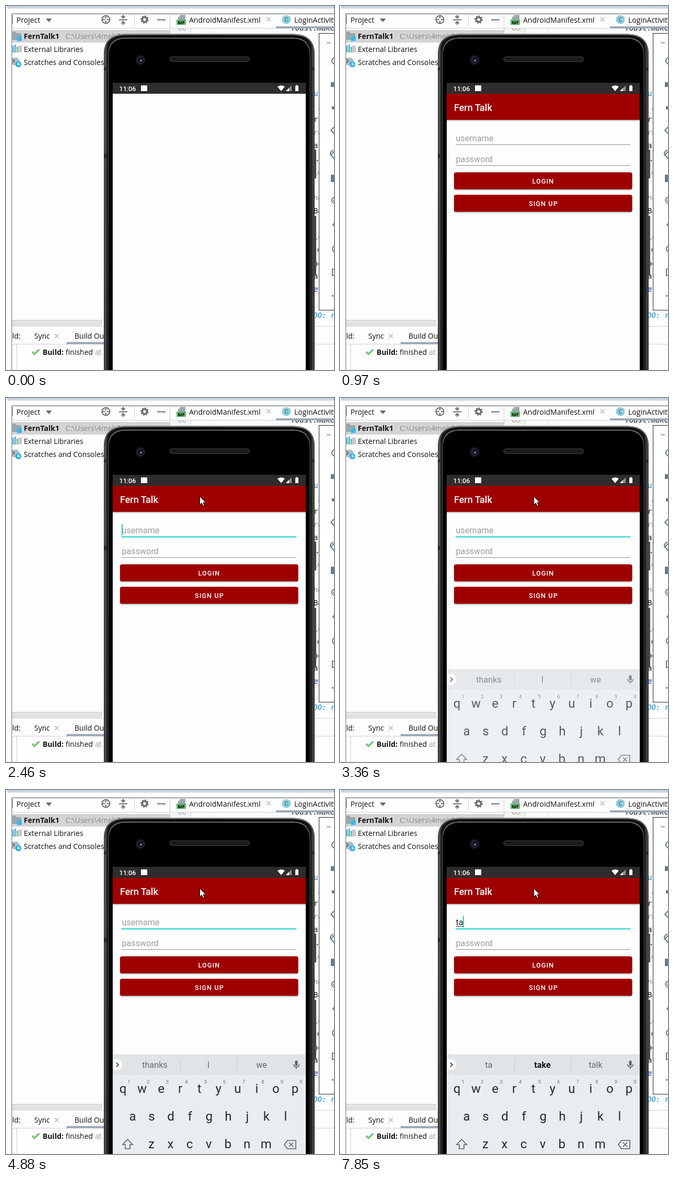
Write an HTML page that moves like this. It is 627 px wide and 697 px high and loops after 8 s.

```html
<!DOCTYPE html>
<html lang="en">
<head>
<meta charset="utf-8">
<title>Login screen demo</title>
<style>
  html, body { margin: 0; width: 100%; height: 100%; overflow: hidden; background: #fff; }
  svg { display: block; width: 627px; height: 697px; }
  text { white-space: pre; }
  .ide { font: 14px "Open Sans", "Noto Sans", sans-serif; fill: #111; }
  .bold { font-weight: 700; }
  .code { font: 14px "DejaVu Sans Mono", monospace; }
  .ui { font-family: Roboto, sans-serif; }
  .field { font-size: 16.16px; }
  .hint { fill: #9c9c9c; }
  .btn { font-size: 12.57px; font-weight: 500; letter-spacing: 1.12px; fill: #fff; }
  .key { font-size: 24px; fill: #202b30; text-anchor: middle; }
  .sup { font-size: 9.5px; fill: #6b757a; text-anchor: middle; }
  .word { font-size: 16.16px; fill: #646b70; text-anchor: middle; }
  .top { font-weight: 700; fill: #111; }
  .line { fill: none; stroke: #6e6e6e; stroke-width: 2; }
  .tool { fill: none; stroke: #607d8b; stroke-width: 2; }
</style>
</head>
<body>
<svg viewBox="0 0 627 697">
  <defs>
    <linearGradient id="edge" x1="0" x2="1" y1="0" y2="0">
      <stop offset="0" stop-color="#777"/><stop offset=".006" stop-color="#5a5a5a"/>
      <stop offset=".018" stop-color="#161616"/><stop offset=".5" stop-color="#000"/>
      <stop offset=".98" stop-color="#111"/><stop offset=".994" stop-color="#4c4c4c"/>
      <stop offset="1" stop-color="#666"/>
    </linearGradient>
    <linearGradient id="rim" x1="0" x2="0" y1="0" y2="1">
      <stop offset="0" stop-color="#8b8b8b"/><stop offset=".05" stop-color="#4a4a4a"/>
      <stop offset="1" stop-color="#303030"/>
    </linearGradient>
    <filter id="drop" x="-5%" y="-20%" width="110%" height="160%">
      <feDropShadow dx="0" dy="1.4" stdDeviation="1.1" flood-opacity=".38"/>
    </filter>
    <clipPath id="win"><path d="M12 15H627V697H12z"/></clipPath>
    <clipPath id="editor"><path d="M314 42H627V613H314z"/></clipPath>
    <clipPath id="screen"><path d="M204 147H573V697H204z"/></clipPath>
  </defs>

  <rect width="627" height="697" fill="#fff"/>
  <rect x="2" width="625" height="5" fill="#c9d5e3"/>

  <!-- Development environment -->
  <g clip-path="url(#win)" class="ide">
    <rect x="12" y="16" width="615" height="681" fill="#fdfdfd"/>
    <text x="20" y="32">Project</text>
    <path d="M76 24h12l-6 7z" fill="#6e6e6e"/>
    <g class="line">
      <circle cx="191" cy="26" r="7.5"/><path d="M191 18v6m0 4v6m-8-8h6m4 0h6"/>
      <path d="M216 26.5h16M224 17v5m0 9v5"/>
      <path d="M220.500 19.500l3.500 3.500 3.500-3.500M220.500 33.500l3.500-3.500 3.500 3.500"/>
      <circle cx="265" cy="26" r="4.500" stroke-width="3.500"/>
      <circle cx="265" cy="26" r="7" stroke-dasharray="2.750 2.750"/>
      <path d="M289 26.500h16"/>
    </g>
    <path d="M12.500 17V35M245.500 15V38" stroke="#cfcfcf"/>
    <path d="M12.500 17V35" stroke="#777"/>
    <path d="M333 17h10v10h-14v-6z" fill="#9aa7b0"/>
    <path d="M329 21h4v-4z" fill="#cdd4d9"/>
    <rect x="326" y="26" width="18" height="10" fill="#62b86a"/>
    <text x="335" y="34.500" font-size="9" class="bold" text-anchor="middle">MF</text>
    <text x="350" y="32">AndroidManifest.xml</text>
    <path d="M498 22l8 8m0-8l-8 8M93 628l8 8m0-8l-8 8" stroke="#b2b2b2" stroke-width="1.200"/>
    <circle cx="536" cy="26" r="8.500" fill="#8fcbe0"/>
    <text x="536" y="30" font-size="11" text-anchor="middle" fill="#27566b">C</text>
    <text x="551" y="32">LoginActivity.java</text>
    <rect x="12" y="46" width="301" height="24" fill="#d4d4d4"/>
    <path d="M12 49h6l2 3h9v13H12z" fill="#9aa7b0"/>
    <rect x="21" y="58" width="9" height="9" fill="#40b6e0"/>
    <text x="34" y="63" class="bold">FernTalk1</text>
    <text x="114" y="63" fill="#8a8a8a">C:\Users\4mel\Documents\And</text>
    <path d="M13.500 76V89M17.500 74V89" stroke="#40a9d0" stroke-width="2.500"/>
    <path d="M21.500 78V89" stroke="#62b86a" stroke-width="2.500"/>
    <path d="M25 76V89M28.500 76V89" stroke="#9aa7b0" stroke-width="2"/>
    <text x="34" y="88">External Libraries</text>
    <path d="M12 99h10l4 5v9H12z" fill="#b3bdc4"/>
    <path d="M12 102l4 3-4 4" class="line" stroke-width="1.500"/>
    <circle cx="23.500" cy="111.500" r="6" fill="#40b6e0"/>
    <path d="M23.500 108v4h3" fill="none" stroke="#fff" stroke-width="1.500"/>
    <text x="34" y="113">Scratches and Consoles</text>

    <path d="M314 42h39v20h-39z" fill="#f3f3f3"/>
    <path d="M313.500 15V60M353.500 43V60" stroke="#cfcfcf"/>
    <path d="M397.500 43V60M508.500 43V60" stroke="#e4e4e4"/>
    <g id="code" class="code" clip-path="url(#editor)"></g>
    <path d="M12 42.500H627" stroke="#d0d0d0"/>
    <rect x="516" y="39" width="111" height="4" fill="#9ba7b7"/>

    <rect x="12" y="601.500" width="171" height="10" fill="#e4e4e4" stroke="#cacaca"/>
    <path d="M12 613.500H627M12 647.500H627M20.500 648V697" stroke="#d0d0d0"/>
    <text x="12" y="637">ld:</text>
    <text x="54" y="637">Sync</text>
    <text x="131" y="637">Build Output</text>
    <rect x="116" y="643.500" width="90" height="4" fill="#9ba7b7"/>
    <path d="M50 662l4.500 4.500 9-9" fill="none" stroke="#7cc07a" stroke-width="3.500"/>
    <text x="70" y="668" class="bold">Build:</text>
    <text x="114" y="668">finished</text>
    <text x="170" y="668" fill="#8d99a6">at</text>
  </g>
  <path d="M11 697V15H627" fill="none" stroke="#858585" stroke-width="1.300"/>

  <!-- Emulator controls -->
  <rect x="598.500" y="52.500" width="40" height="530" fill="#fff" stroke="#222"/>
  <g class="tool">
    <path d="M613 70.500h8" stroke="#9aa5aa"/>
    <path d="M627 99a6.500 6.500 0 0 0 0 12"/>
    <path d="M622 147h5v7h-5zM624 193h3v4h-3z" fill="#607d8b"/>
    <path d="M628 231l-7 7 7 7M628 278l-7 7 7 8M620 285a8 8 0 0 1 6-9"/>
    <path d="M622 324h5v12h-5z" fill="#607d8b"/>
    <circle cx="628" cy="372" r="5.500"/><path d="M625 372h3"/>
    <path d="M628 415l-3 4 3 3"/>
    <circle cx="630" cy="465" r="6"/>
    <path d="M628 504h-4v12h4"/>
    <path d="M623 555h3" stroke-width="3"/>
  </g>

  <!-- Phone body -->
  <path d="M588 275h5v55h-5zM588 402h5v114h-5z" fill="#4b4b4b"/>
  <path d="M187 697V92Q187 54 227 53.500H550Q590 54 590 92V697z" fill="url(#edge)"/>
  <path d="M188 697V92Q188 55 227 54.500H550Q589 55 589 92V697" fill="none" stroke="url(#rim)" stroke-width="2"/>
  <path d="M196 697V94Q196 62 228 61.500H549Q581 62 581 94V697" fill="#000" stroke="url(#rim)" stroke-width="1.300"/>
  <path d="M187 118h6v5h-6zM584 118h6v5h-6zM187 283h6v8h-6z" fill="#2a2a2a"/>
  <circle cx="257" cy="103.500" r="8" fill="#17151b" stroke="#37343b"/>
  <circle cx="257" cy="103.500" r="4.500" fill="#11122c" stroke="#333056"/>
  <circle cx="258" cy="104.500" r="1.400" fill="#a9b4e8"/>
  <rect x="312.500" y="97" width="153" height="9.500" rx="4.500" fill="#252323" stroke="#3a3737"/>
  <path d="M316 100H463M317 103.500H463" stroke="#080808" stroke-width="2" stroke-dasharray="2 1.600"/>

  <!-- Phone screen -->
  <g clip-path="url(#screen)" class="ui">
    <rect x="204" y="147" width="369" height="550" fill="#fdfdfd"/>
    <rect x="204" y="147" width="369" height="21" fill="#2d2d2d"/>
    <text x="216.500" y="162.500" font-size="12.57" font-weight="500" fill="#fff">11:06</text>
    <rect x="258" y="152" width="12" height="11" fill="#fff"/>
    <path d="M519 154.500q7-5 14 0l-7 8.500z" fill="#fff"/>
    <path d="M546 152v11h-11z" fill="#8a8a8a"/><path d="M541 157v6h-6z" fill="#fff"/>
    <path d="M553 153h1.500v-1.500h3V153h1.500v10h-6z" fill="#fff"/>

    <g id="app">
      <rect x="203" y="168" width="371" height="50" fill="#9e0000" filter="url(#drop)"/>
      <text x="218" y="200.500" font-size="18" font-weight="500" fill="#fff">Fern Talk</text>
      <text id="name" class="field hint" x="221.500" y="259">username</text>
      <path id="compose" stroke="#333"/>
      <text class="field hint" x="221.500" y="299">password</text>
      <path d="M221 265.500H555M221 305.500H555" stroke="#8b8b90"/>
      <g id="focus"><path d="M221 266H555" stroke="#1fd5c5" stroke-width="2"/></g>
      <rect id="caret" y="241" width="2" height="22" fill="#1fd5c5"/>
      <g fill="#9e0000" filter="url(#drop)">
        <rect x="218" y="318.500" width="340.500" height="32.500" rx="3.600"/>
        <rect x="218" y="361.500" width="340.500" height="32.500" rx="3.600"/>
      </g>
      <text class="btn" x="367.500" y="339.500">LOGIN</text>
      <text class="btn" x="361" y="382.500">SIGN UP</text>
    </g>

    <g id="board">
      <rect x="204" y="506" width="369" height="260" fill="#e9edf0"/>
      <rect x="204" y="506" width="369" height="40" fill="#e0e4e7"/>
      <circle cx="211" cy="526" r="11" fill="#fff"/>
      <path d="M211 522l4 4-4 4" fill="none" stroke="#222" stroke-width="1.600"/>
      <path d="M333.500 515v22M441.500 515v22" stroke="#c3c9cc"/>
      <text class="word" x="284.500" y="532"></text>
      <text class="word" x="387" y="532"></text>
      <text class="word" x="488.500" y="532"></text>
      <rect x="552.500" y="518" width="5" height="10" rx="2.500" fill="#5b656a"/>
      <path d="M549.500 525a5.500 5.500 0 0 0 11 0M555 531v3" fill="none" stroke="#5b656a" stroke-width="1.600"/>
      <g id="keys"></g>
      <g fill="none" stroke="#566168" stroke-width="1.600">
        <path d="M232.500 669l-9.500 10h5v8h9v-8h5z"/>
        <path d="M532 679l6-8h16v16h-16zM541 675l8 8m0-8l-8 8"/>
      </g>
    </g>
  </g>

  <path id="mouse" d="M.5 .5V16.500L4.200 13l2.600 5.500 2.500-1.100-2.500-5.300h4.800z" fill="#fff" stroke="#111"/>
</svg>
<script>
const LOOP = 8000;
const $ = id => document.getElementById(id);

function addText(parent, cls, x, y, value, fill) {
  const el = document.createElementNS("http://www.w3.org/2000/svg", "text");
  el.setAttribute("class", cls);
  el.setAttribute("x", x);
  el.setAttribute("y", y);
  if (fill) el.setAttribute("fill", fill);
  el.textContent = value;
  parent.append(el);
  return el;
}

// Code showing beside and above the phone: x, baseline, text, colour, italic
const blue = "#1750eb", navy = "#0033b3", gray = "#8c8c8c";
[
  [328, 47, "68", "#aaa"], [544, 47, "Toast.", "#111"], [594.6, 47, "make", "#111", 1],
  [588, 172, "ur", "#1f6fb5"], [595, 197, ",", gray, 1], [588, 222, "r", "#111"],
  [588, 247, "re", gray, 1], [588, 272, "ar", "#111"], [591, 297, ".", "#111"],
  [594, 322, "/", gray, 1], [588, 372, "ne", gray, 1], [588, 397, "Ba", "#111"],
  [588, 447, "lo", blue], [594, 472, "=", "#111"], [588, 498, "og", "#111"],
  [588, 522, "ar", "#111"], [588, 547, "et", navy], [587, 597, "OO: r", "#0089d0", 1]
].forEach(([x, y, value, fill, italic]) => {
  const el = addText($("code"), "code", x, y, value, fill);
  if (italic) el.style.fontStyle = "italic";
});

const PITCH = 36.55;
[["qwertyuiop", 223.5, 580], ["asdfghjkl", 242, 633], ["zxcvbnm", 278, 686]]
  .forEach(([row, x, y], r) => [...row].forEach((key, i) => {
    addText($("keys"), "key", x + i * PITCH, y, key);
    if (!r) addText($("keys"), "sup", x + 11.5 + i * PITCH, 562, (i + 1) % 10);
  }));

// Each track lists [start time, value]; values hold until the next entry.
const tracks = {
  app: [[0, 0], [840, .22], [970, 1]],
  mouse: [[0, null], [1360, [411, 215]], [1510, [398, 210]], [1630, [388, 206]],
          [1790, [374, 197]], [1940, [371, 190]], [2070, [370, 188]]],
  focus: [[0, 0], [2340, .5], [2460, 1]],
  caret: [[0, 0], [2340, .5], [2460, 1], [3240, 0], [3510, 1], [3910, 0], [4470, 1], [4880, 0],
          [5460, 1], [5860, 0], [6450, 1], [7410, 0], [7850, 1]],
  board: [[0, [52, 0]], [3240, [52, .25]], [3360, [13, .76]], [3510, [0, 1]]],
  typed: [[0, ""], [6450, "t"], [6850, "ta"]],
  words: [[0, ["thanks", "I", "we"]], [6450, ["t", "the", "thanks"]], [6850, ["ta", "take", "talk"]]]
};
const at = (track, t) => track.findLast(([start]) => start <= t)[1];
const caretX = [221, 226, 235];
const wordEls = document.querySelectorAll(".word");

function draw(t) {
  const now = name => at(tracks[name], t);
  for (const id of ["app", "focus", "caret"]) $(id).style.opacity = now(id);

  const mouse = now("mouse");
  $("mouse").style.display = mouse ? "" : "none";
  if (mouse) $("mouse").setAttribute("transform", `translate(${mouse})`);

  const [drop, alpha] = now("board");
  $("board").setAttribute("transform", `translate(0 ${drop})`);
  $("board").style.opacity = alpha;

  const typed = now("typed"), end = caretX[typed.length];
  $("name").textContent = typed || "username";
  $("name").style.fill = typed ? "#222" : "";
  $("caret").setAttribute("x", end);
  $("compose").setAttribute("d", typed ? `M221.5 261.5H${end}` : "");

  now("words").forEach((word, i) => {
    wordEls[i].textContent = word;
    wordEls[i].classList.toggle("top", i === 1 && typed === "ta");
  });
}

const begin = performance.now();
function tick() {
  draw((performance.now() - begin) % LOOP);
  requestAnimationFrame(tick);
}
tick();
</script>
</body>
</html>
```
